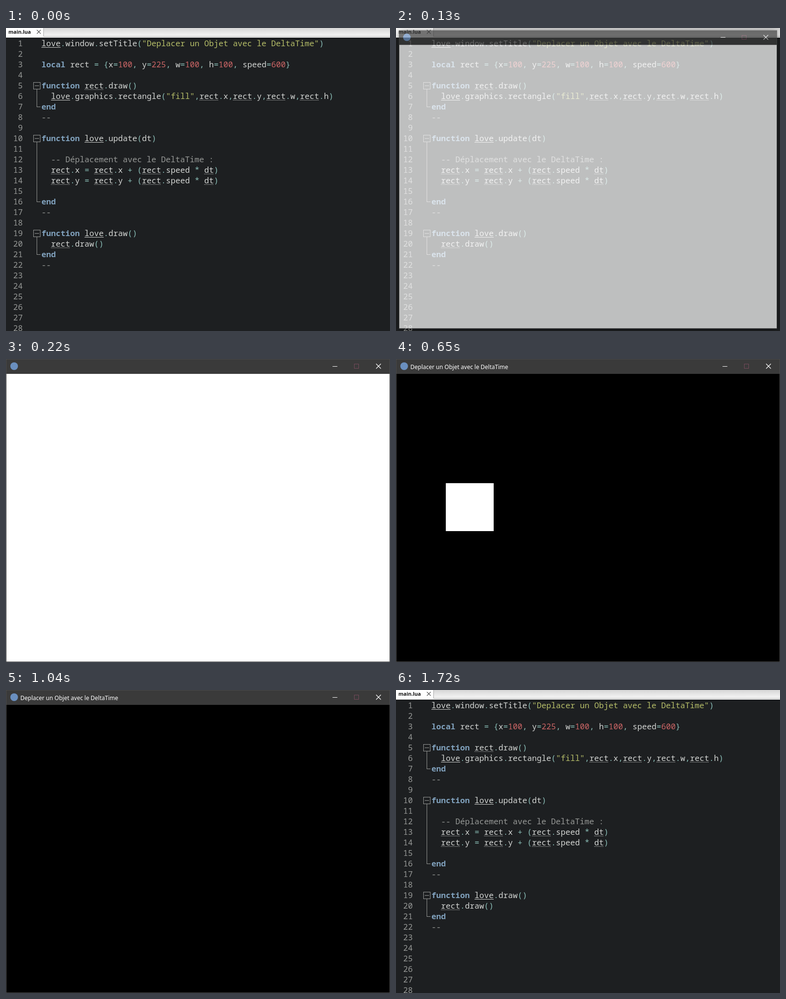
Recreate the animation shown at these times as an HTML page. Size 802 by 632 pixels, loop 1750 ms.

```html
<!DOCTYPE html>
<html lang="fr">
<head>
<meta charset="utf-8">
<title>DeltaTime</title>
<style>
html, body { margin: 0; width: 100%; height: 100%; overflow: hidden; background: #1d1f21; }
svg { display: block; width: 802px; height: 632px; }
.code { font: 16.667px "Noto Sans Mono", monospace; }
.tab { font: bold 10.7px "Open Sans", sans-serif; }
.title { font: 12px "Noto Sans", sans-serif; }
.crisp { shape-rendering: crispEdges; }
</style>
</head>
<body>
<svg viewBox="0 0 802 632" xmlns="http://www.w3.org/2000/svg">
  <defs>
    <linearGradient id="bar" x2="0" y2="1">
      <stop offset="0" stop-color="#d6d6d6"/>
      <stop offset="1" stop-color="#f6f6f6"/>
    </linearGradient>
  </defs>

  <rect width="802" height="632" fill="#1d1f21"/>
  <g id="editor" class="code"></g>
  <rect width="802" height="20" fill="#fff"/>
  <rect x="78" width="724" height="17" fill="url(#bar)"/>
  <path d="M78.5 0V17.5H802" fill="none" stroke="#a8a8a8" class="crisp"/>
  <text class="tab" x="5" y="12" fill="#111">main.lua</text>
  <path d="M64.5 4l8 8m0-8l-8 8" stroke="#555" stroke-width="1.1"/>

  <g id="win">
    <rect width="802" height="632" fill="#4a4a4a"/>
    <rect x="1" y="1" width="800" height="30" fill="#3a3a3a"/>
    <rect id="page" x="1" y="31" width="800" height="600"/>
    <svg x="1" y="31" width="800" height="600">
      <rect id="box" width="100" height="100" fill="#fff"/>
    </svg>
    <rect id="hover" x="757" y="1" width="44" height="29" fill="#e81123"/>
    <circle cx="17" cy="15" r="8" fill="#6a8fbf"/>
    <text id="title" class="title" x="30" y="21" fill="#fff">Deplacer un Objet avec le DeltaTime</text>
    <g fill="none" stroke="#fff">
      <path d="M682 15.5h10" class="crisp"/>
      <path d="M727.5 10.5h9v9h-9z" stroke="#75495a" class="crisp"/>
      <path d="M773 10l10 10m0-10l-10 10" stroke-width="1.2"/>
    </g>
  </g>
  <path id="cursor" d="M.5.5v16l3.7-3.5 2.5 5.6 2.2-1-2.4-5.4h5.2z" fill="#000" stroke="#fff"/>
</svg>

<script>
const LOOP = 1750, STEP = 30, PITCH = 10, ROW = 22, LEFT = 74;
const OPEN = 70, START = 650, GONE = 1040, HOVER = 1370, CLOSE = 1570, END = 1720;
const $ = id => document.getElementById(id);

const source = `love.window.setTitle("Deplacer un Objet avec le DeltaTime")

local rect = {x=100, y=225, w=100, h=100, speed=600}

function rect.draw()
  love.graphics.rectangle("fill",rect.x,rect.y,rect.w,rect.h)
end
--

function love.update(dt)

  -- Déplacement avec le DeltaTime :
  rect.x = rect.x + (rect.speed * dt)
  rect.y = rect.y + (rect.speed * dt)

end
--

function love.draw()
  rect.draw()
end
--`.split("\n");

const kinds = [
  [/^--/, "#969896"],
  [/^"/, "#b5bd68"],
  [/^\d/, "#cc6666"],
  [/^(local|function|end)$/, "#81a2be"],
  [/^\w/, "#d2d4d2"],
  [/./, "#8abeb7"]
];

function add(tag, attrs, text) {
  const el = document.createElementNS("http://www.w3.org/2000/svg", tag);
  for (const k in attrs) el.setAttribute(k, attrs[k]);
  if (text) el.textContent = text;
  $("editor").append(el);
}

const stroke = (d, color, dash = "none") =>
  add("path", { d, stroke: color, fill: "none", "stroke-dasharray": dash, class: "crisp" });

function drawLine(line, y) {
  const declares = /^(local|function love)/.test(line);
  for (const m of line.matchAll(/--.*|"[^"]*"|\w+|[^\s\w]/g)) {
    const word = m[0], x = LEFT + m.index * PITCH;
    const [, fill] = kinds.find(([re]) => re.test(word));
    const weight = fill === "#81a2be" ? "bold" : "normal";
    add("text", { x, y, fill, "font-weight": weight }, word);
    const under = `M${x} ${y + 2.5}h${word.length * PITCH}`;
    if (word === "love") stroke(under, fill);
    else if (/^(rect|dt)$/.test(word) && !declares) stroke(under, fill, "1 1");
  }
}

function drawFold(first, last) {
  const mid = n => 32.5 + (n - 1) * ROW, y = mid(first);
  stroke(`M57.5 ${y - 7}h14v14h-14zM60 ${y}h9M64.5 ${y + 7}V${mid(last)}h7`, "#969896");
}

for (let n = 1; n <= 28; n++) {
  const y = 38 + (n - 1) * ROW;
  add("text", { x: 35, y, fill: "#969896", "text-anchor": "end" }, String(n));
  drawLine(source[n - 1] || "", y);
}
[[5, 7], [10, 16], [19, 21]].forEach(f => drawFold(...f));

const steps = (t, from) => Math.floor((t - from) / STEP);
const show = (el, on) => el.setAttribute("visibility", on ? "inherit" : "hidden");

function placeWindow(t) {
  const win = $("win");
  show(win, t >= OPEN && t < END);
  let alpha = 1, scale = 1;
  if (t < CLOSE) {
    const rest = 1 - Math.min(1, (steps(t, OPEN) + 1) / 6);
    alpha = 1 - rest ** 1.8;
    scale = 1 - 0.1 * rest ** 2.75;
  } else {
    const u = Math.min(1, (steps(t, CLOSE) + 1) / 6);
    alpha = (1 - u) ** 1.3;
    scale = 1 - 0.1 * u;
  }
  win.setAttribute("opacity", Math.max(0, alpha));
  win.setAttribute("transform", `translate(401 316) scale(${scale}) translate(-401 -316)`);
  win.style.filter = scale < 1 ? "drop-shadow(0 2px 8px rgba(0,0,0,.6))" : "none";
}

function render(t) {
  placeWindow(t);

  const running = t >= START;
  $("page").setAttribute("fill", running ? "#000" : "#fff");
  show($("title"), running);
  show($("box"), running && t < GONE);
  const moved = 30 * steps(t, START);
  $("box").setAttribute("x", 103 + moved);
  $("box").setAttribute("y", 228 + moved);

  const h = steps(t, HOVER);
  $("hover").setAttribute("opacity", h < 0 ? 0 : Math.min(1, 0.1 + 0.45 * h));
  const out = Math.max(0, steps(t, CLOSE));
  show($("cursor"), h >= 0 && t < END);
  const cx = 799 - 8 * Math.min(2, h) + 8 * out;
  $("cursor").setAttribute("transform", `translate(${cx} 8)`);
}

const begin = performance.now();
function tick() {
  render((performance.now() - begin) % LOOP);
  requestAnimationFrame(tick);
}
tick();
</script>
</body>
</html>
```
